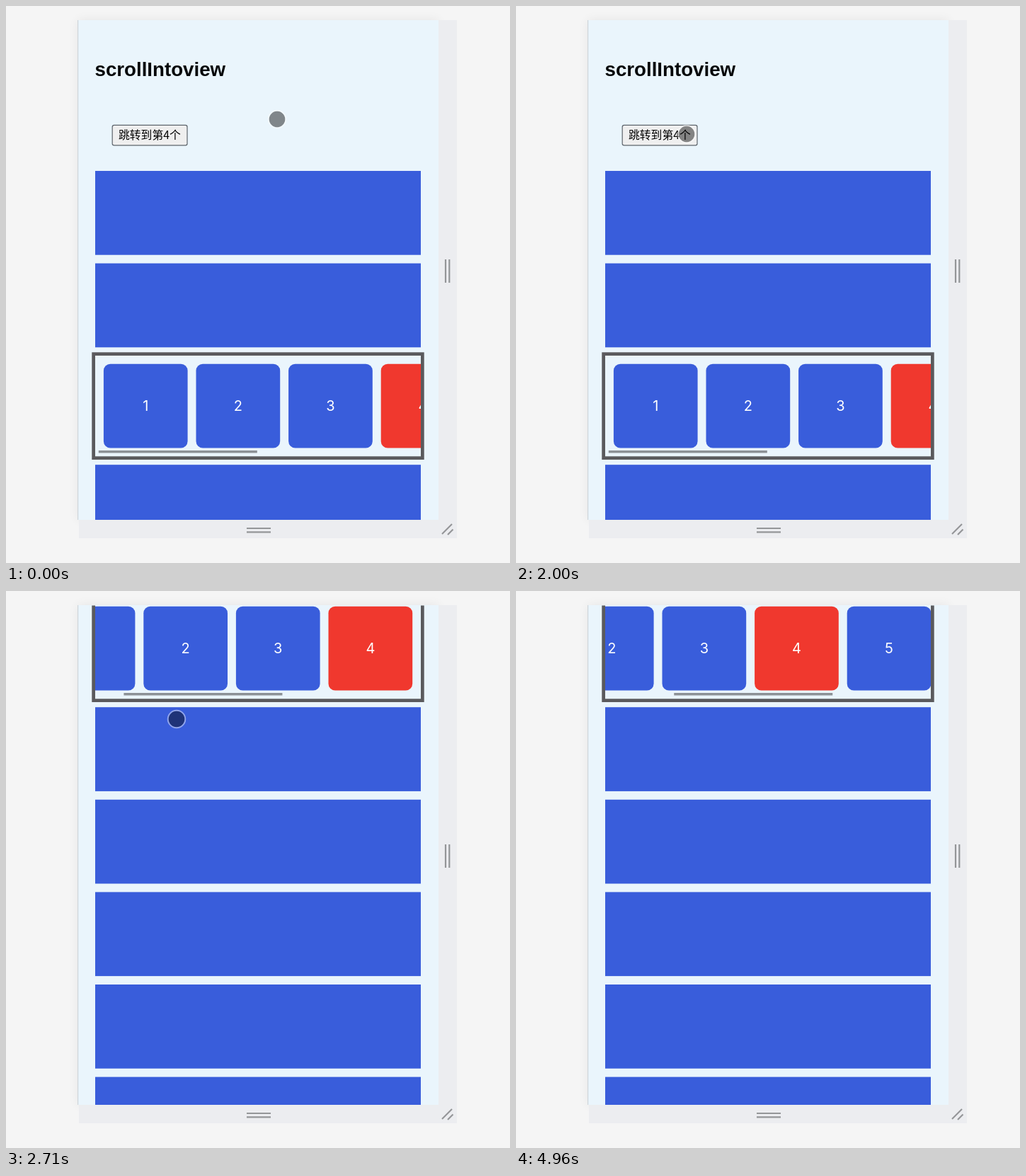
An HTML page with a canvas for the animation above (5580 ms loop, 712 by 787 pixels).

```html
<!DOCTYPE html>
<html lang="zh">
<head>
<meta charset="utf-8">
<title>scrollIntoview</title>
<style>
html, body { margin: 0; width: 100%; height: 100%; overflow: hidden; background: #f5f5f5; }
canvas { display: block; }
</style>
</head>
<body>
<canvas id="stage" width="712" height="787"></canvas>
<script>
const ctx = document.getElementById('stage').getContext('2d');
const LOOP = 5580, FPS = 24;
const BLUE = '#395ddb', RED = '#f0382e', PAGE = '#eaf5fc', GREY = '#949698';
const SIZE = 118.7, PITCH = 130.6, LEFT = 126, WIDTH = 460;
const JUMP = 484, SLIDE = 192.6;

const clamp = x => Math.min(1, Math.max(0, x));
const smooth = x => x * x * (3 - 2 * x);

// cubic-bezier(.42, 0, .58, 1), solved by bisection
function easeInOut(x) {
  const curve = (u, a, b) => 3 * (1 - u) * (1 - u) * u * a + 3 * (1 - u) * u * u * b + u ** 3;
  let lo = 0, hi = 1;
  for (let i = 0; i < 24; i++) {
    const mid = (lo + hi) / 2;
    if (curve(mid, .42, .58) < x) lo = mid; else hi = mid;
  }
  return curve(lo, 0, 1);
}

function rect(x, y, w, h, color) {
  ctx.fillStyle = color;
  ctx.fillRect(x, y, w, h);
}

function round(x, y, w, h, r, color) {
  ctx.beginPath();
  ctx.roundRect(x, y, w, h, r);
  ctx.fillStyle = color;
  ctx.fill();
}

function line(x1, y1, x2, y2) {
  ctx.strokeStyle = GREY;
  ctx.lineWidth = 2.2;
  ctx.beginPath();
  ctx.moveTo(x1, y1);
  ctx.lineTo(x2, y2);
  ctx.stroke();
}

function text(str, x, y, font, color, align = 'left') {
  ctx.font = font;
  ctx.fillStyle = color;
  ctx.textAlign = align;
  ctx.fillText(str, x, y);
}

function clipTo(x, y, w, h, paint) {
  ctx.save();
  ctx.beginPath();
  ctx.rect(x, y, w, h);
  ctx.clip();
  paint();
  ctx.restore();
}

function drawShell() {
  rect(0, 0, 712, 787, '#f5f5f5');
  ctx.save();
  ctx.shadowColor = 'rgba(0,0,0,.07)';
  ctx.shadowBlur = 14;
  rect(102, 20, 509, 706, PAGE);
  ctx.restore();
  rect(611, 20, 26, 732, '#ecedf0');
  rect(103, 726, 534, 26, '#ecedf0');
  rect(101, 20, 1.2, 706, '#cfd5da');
  line(621, 358, 621, 391);
  line(626.3, 358, 626.3, 391);
  line(340, 738, 374, 738);
  line(340, 743.4, 374, 743.4);
  line(616, 746, 630, 732);
  line(624, 747, 631.5, 739.5);
}

function drawCards(slide) {
  clipTo(LEFT, 494, WIDTH, 142.3, () => {
    for (let n = 1; n <= 5; n++) {
      const x = 137.9 + (n - 1) * PITCH - slide;
      round(x, 505.8, SIZE, SIZE, 9.5, n === 4 ? RED : BLUE);
      text(n, x + SIZE / 2, 572.3, '20px Inter, sans-serif', '#fff', 'center');
    }
    rect(130.8 + slide * .48, 628, 224, 3.5, '#8c9196');
  });
  ctx.strokeStyle = '#5a5a5d';
  ctx.lineWidth = 4.7;
  ctx.strokeRect(LEFT - 2.35, 491.65, WIDTH + 4.7, 147);
}

function drawPage(scroll, slide) {
  ctx.save();
  ctx.translate(0, -scroll);
  text('scrollIntoview', 125.5, 99, 'bold 27.7px "Liberation Sans", Arial, sans-serif', '#050709');
  round(149.6, 167.8, 107, 29.6, 3, '#5d646b');
  round(150.8, 169, 104.6, 27.2, 2, '#efefef');
  text('跳转到第4个', 159, 188.4, '15.82px "Noto Sans CJK SC", "Noto Sans CJK", sans-serif', '#000');
  for (let i = 0; i < 2; i++) rect(LEFT, 233 + i * PITCH, WIDTH, SIZE, BLUE);
  drawCards(slide);
  for (let i = 0; i < 5; i++) rect(LEFT, 648.2 + i * PITCH, WIDTH, SIZE, BLUE);
  ctx.restore();
}

function drawCursor(x, y) {
  ctx.beginPath();
  ctx.arc(x, y, 11.4, 0, 7);
  ctx.fillStyle = 'rgba(0,0,0,.45)';
  ctx.fill();
  ctx.beginPath();
  ctx.arc(x, y, 12.3, 0, 7);
  ctx.strokeStyle = 'rgba(255,255,255,.45)';
  ctx.lineWidth = 1.9;
  ctx.stroke();
}

function draw(now) {
  const step = Math.floor((now % LOOP + 4) * FPS / 1000);
  const t = step * 1000 / FPS;
  const jumped = step >= 62;
  const slide = jumped ? SLIDE * easeInOut(clamp((t - 2537) / 396)) : 0;

  drawShell();
  clipTo(102, 20.5, 509, 705.5, () => drawPage(jumped ? JUMP : 0, slide));

  const move = smooth(clamp((t - 590) / 590));
  const leave = clamp((step - 110) / 3) ** 1.5;
  if (step < 114) {
    drawCursor(383 - 142 * move + 111 * leave, 160 + 21 * move ** 1.5 - 106 * leave);
  }
}

const start = performance.now();
function tick() {
  draw(performance.now() - start);
  requestAnimationFrame(tick);
}
tick();
</script>
</body>
</html>
```
